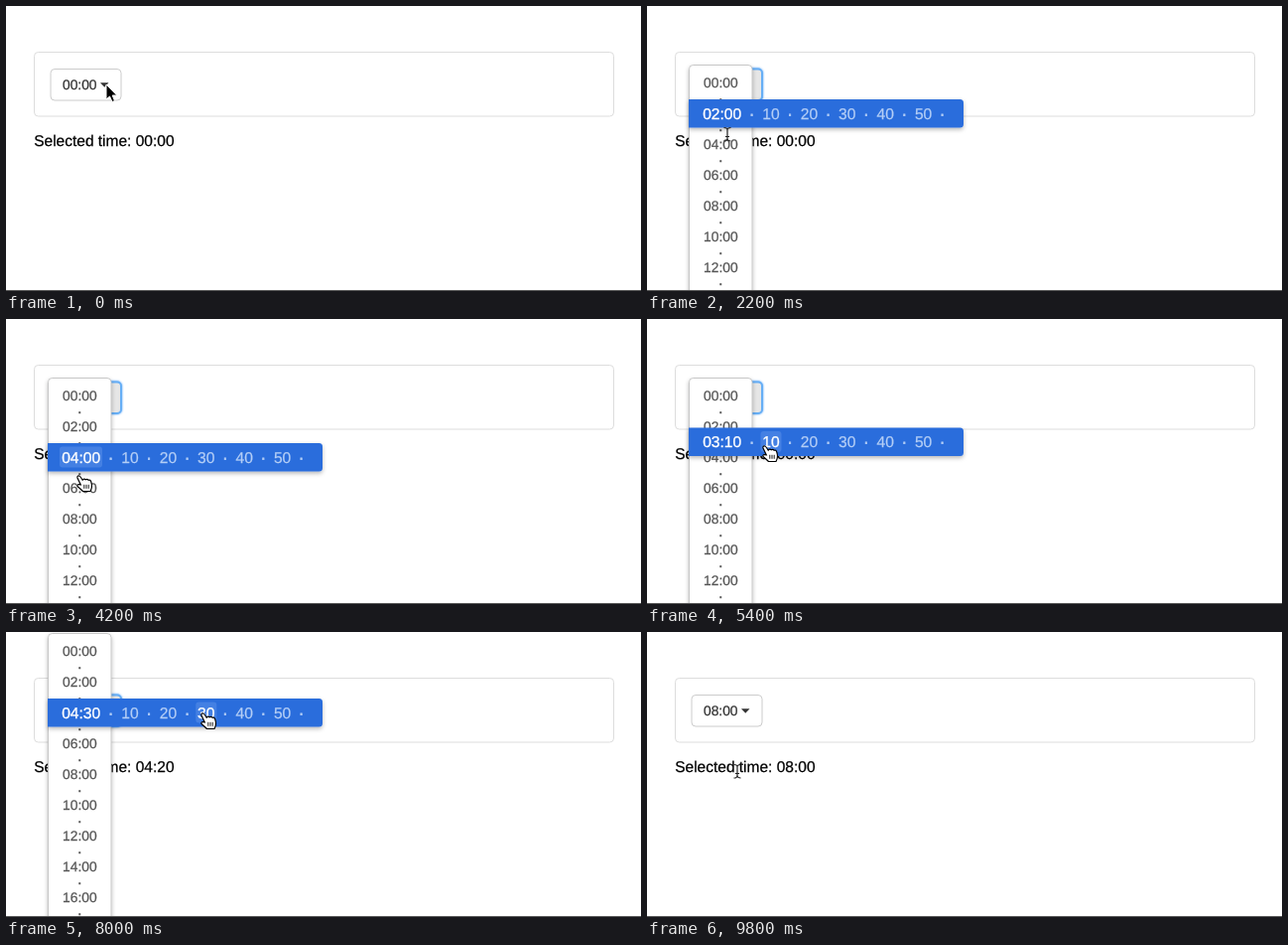
An HTML page for the animation above (10000 ms loop, 640 px wide and 287 px high).

```html
<!DOCTYPE html>
<html lang="en">
<head>
<meta charset="utf-8">
<title>Time picker</title>
<style>
  html, body { margin: 0; width: 100%; height: 100%; overflow: hidden; background: #fff; }
  svg { display: block; width: 640px; height: 287px; }
  text {
    font: 13.8px "Liberation Sans", Arial, sans-serif; text-rendering: geometricPrecision;
    color: #333; fill: currentColor; stroke: currentColor; stroke-width: .25;
  }
  .large { font-size: 15.5px; color: #000; }
  .hour { color: #555; }
  .mid { text-anchor: middle; }
  .dot { stroke-width: .6; }
  .bar text { font-size: 15.6px; color: #b4cef6; }
  .bar .on { color: #fff; stroke-width: .35; }
</style>
</head>
<body>
<svg id="stage" viewBox="0 0 640 287">
  <defs>
    <filter id="shadow" x="-30%" y="-30%" width="160%" height="160%">
      <feDropShadow dx="0" dy="2" stdDeviation="2" flood-opacity=".28"/>
    </filter>
    <filter id="glow" x="-30%" y="-40%" width="160%" height="180%">
      <feDropShadow dx="0" dy="0" stdDeviation="1.2" flood-color="#58a6f8"/>
    </filter>
    <linearGradient id="pressed" x2="0" y2="1">
      <stop stop-color="#cfcfcf"/><stop offset=".16" stop-color="#e4e4e4"/>
    </linearGradient>
  </defs>
  <rect x="28.5" y="46.5" width="584" height="64.5" rx="4" fill="#fff" stroke="#ddd"/>
  <g id="scene"></g>
  <path d="M0 286.5H640" stroke="#5c5c5c"/>
  <g id="cursor"></g>
</svg>
<script>
const LOOP = 10000, STEP = 200, ROW = 15.5, MINUTE = 38.4;
const scene = document.getElementById('scene');
const cursor = document.getElementById('cursor');

// Pointer path: time, x, y
const path = [
  [0, 101, 79], [400, 101, 79], [1200, 80, 248], [2000, 80, 78], [2200, 81, 129],
  [2700, 78, 250], [3200, 72, 157], [3600, 72, 78], [4200, 76, 158], [4800, 85, 125],
  [5200, 121, 127], [5400, 121, 128], [5800, 78, 248], [6200, 85, 140], [6600, 163, 140],
  [6800, 163, 140], [7200, 104, 78], [7400, 104, 78], [7900, 201, 82], [8200, 201, 82],
  [8600, 111, 81], [8800, 111, 81], [9600, 91, 140], [LOOP, 91, 140]
];
const openings = [[400, 6800], [7400, 8200], [8800, 9800]];
const presses = [200, 7200, 8600];
const textHovers = [2200, 6800, 9800];
const choices = [[9800, '08:00'], [8200, '04:30'], [6800, '04:20'], [0, '00:00']];

const shapes = {
  arrow: '<path d="M0 0V15L3.5 12 6 17.5 8.5 16.5 6.2 11H10.8Z" stroke="#fff"/>',
  beam: '<path d="M-3.5-6.5Q0-6.5 0-4Q0-6.5 3.5-6.5M0-4V4.5M-3.5 7Q0 7 0 4.5Q0 7 3.5 7M-2 2.5H2" fill="none" stroke="#222" stroke-width="1.2"/>',
  hand: `<path d="M-4 2Q-4.5-.3-2.3 0Q-1.2.3 1.2 4.2Q2.5 2.4 4.3 3.8Q5.8 2.7 7.2 4.3Q8.9 3.5 9.8 6
    Q11.5 11 9 15.5H1.5Q-1 13-4 10.5Q-4.8 8-.8 8.8Z" fill="#fff" stroke="#000" stroke-width="1.2"/>
    <path d="M2.8 8.8V12.8M5 8.8V12.8M7.2 8.8V12.8" stroke="#000" stroke-width=".9"/>`
};

const pad = n => String(n).padStart(2, '0');
const label = (x, y, value, cls = '') => `<text x="${x}" y="${y}" class="${cls}">${value}</text>`;

function pointerAt(t) {
  t = Math.max(0, t);
  const i = path.findIndex(key => key[0] > t);
  const [t0, x0, y0] = path[i - 1], [t1, x1, y1] = path[i];
  const k = (t - t0) / (t1 - t0);
  return [x0 + (x1 - x0) * k, y0 + (y1 - y0) * k];
}

function button(value, pressed, open) {
  const fill = pressed ? 'url(#pressed)' : open ? '#e6e6e6' : '#fff';
  const border = open ? 'stroke="#66aef5" stroke-width="2" filter="url(#glow)"'
                      : `stroke="${pressed ? '#a0a0a0' : '#ccc'}"`;
  return `<rect x="45" y="63.5" width="71" height="31.5" rx="4" fill="${fill}" ${border}/>
    ${label(57, 83.5, value)}<path d="M95 77.3H103.5L99.25 81.7Z" fill="#333"/>`;
}

function menu(base) {
  let out = `<rect x="42.5" y="${base - 17.5}" width="63.5" height="410" rx="4"
    fill="#fff" stroke="#bbb" stroke-width=".8" filter="url(#shadow)"/>`;
  for (let hour = 0; hour < 18; hour++) {
    const y = base + hour * ROW + 5;
    out += hour % 2 ? label(74.3, y, '·', 'hour mid dot') : label(74.3, y, pad(hour) + ':00', 'hour mid');
  }
  return out;
}

function bar(base, x, y, selected, showCell) {
  const hour = Math.max(0, Math.round((y - base) / ROW));
  const center = base + hour * ROW;
  const nearest = Math.round((x - 125) / MINUTE) + 1;
  const minute = nearest > 0 && Math.abs(x - 125 - (nearest - 1) * MINUTE) < 11 ? nearest : 0;
  const kept = x > 97 && hour === parseInt(selected) ? selected.slice(3) : '00';
  const time = pad(hour) + ':' + (minute ? minute * 10 : kept);
  const cell = (cx, w) => `<rect x="${cx - w / 2}" y="${center - 10.5}" width="${w}" height="21" rx="3" fill="#4480e3"/>`;

  let out = `<path d="M42 ${center - 14}H315.5q3.5 0 3.5 3.5v21.5q0 3.5-3.5 3.5H42Z" fill="#2c6ddc" filter="url(#shadow)"/>`;
  if (showCell && minute) out += cell(125 + (minute - 1) * MINUTE, 21);
  else if (showCell && x < 97) out += cell(75.5, 43);
  out += label(75.7, center + 5.5, time, 'on mid');
  for (let i = 0; i < 6; i++) {
    out += label(105.7 + i * MINUTE, center + 5.5, '·', 'mid dot');
    if (i < 5) out += label(125 + i * MINUTE, center + 5.5, (i + 1) * 10, i + 1 === minute ? 'on mid' : 'mid');
  }
  return `<g class="bar">${out}</g>`;
}

function draw(t) {
  const open = openings.some(([from, to]) => t >= from && t < to);
  const pressed = presses.includes(t);
  const selected = choices.find(([from]) => t >= from)[1];
  const base = t < 6800 ? 77 : 19;
  const kind = textHovers.includes(t) ? 'beam' : open || pressed ? 'hand' : 'arrow';

  let out = button(selected, pressed, open) + label(28.2, 140.5, 'Selected time: ' + selected, 'large');
  // The highlighted row trails the pointer slightly.
  if (open) out += menu(base) + bar(base, ...pointerAt(t - 100), selected, kind === 'hand');
  scene.innerHTML = out;

  const [x, y] = pointerAt(t);
  cursor.setAttribute('transform', `translate(${x} ${y})`);
  cursor.innerHTML = shapes[kind];
}

let shown = -1;
const start = performance.now();
function tick() {
  const t = Math.floor((performance.now() - start) % LOOP / STEP) * STEP;
  if (t !== shown) draw(shown = t);
  requestAnimationFrame(tick);
}
tick();
</script>
</body>
</html>
```
